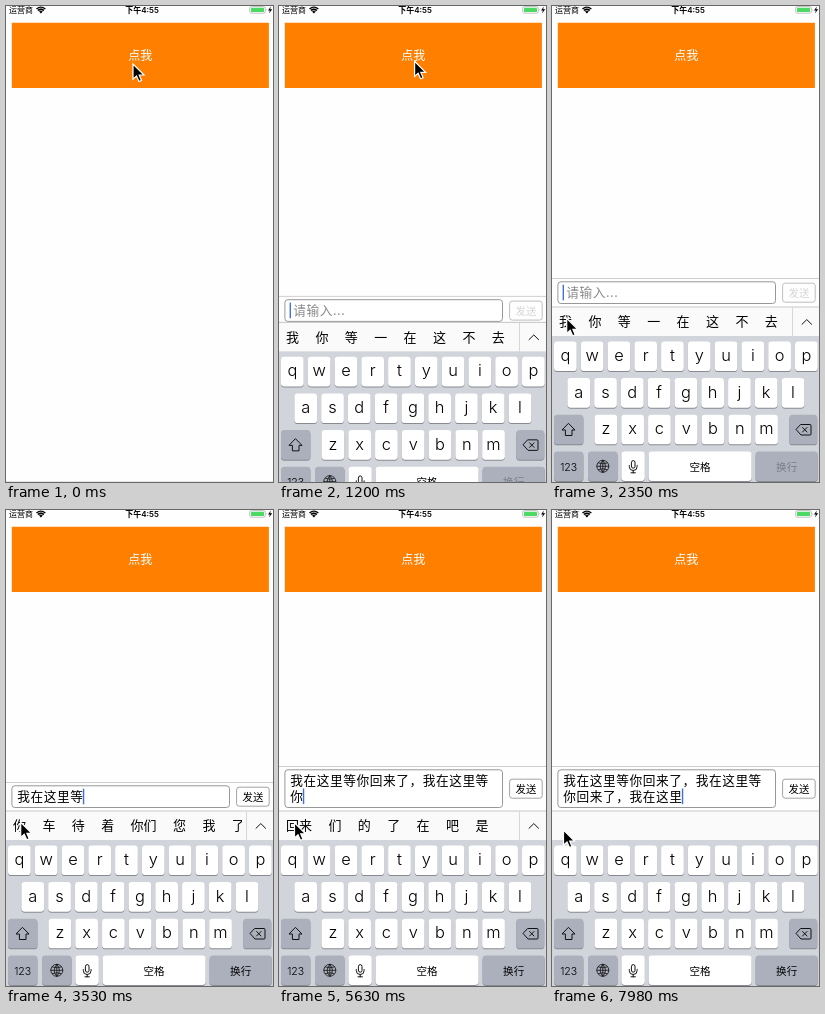
Animation of 267 by 476 pixels, one loop 8 s. Source, as an HTML page:

```html
<!DOCTYPE html>
<html lang="zh-CN">
<head>
<meta charset="utf-8">
<title>键盘输入</title>
<style>
html, body { margin: 0; width: 100%; height: 100%; overflow: hidden; background: #fff; }
svg { display: block; width: 267px; height: 476px; }
text { font-family: "Noto Sans CJK SC", "Noto Sans CJK", sans-serif; font-weight: 350; fill: #000; }
.latin { font-family: Inter, Roboto, sans-serif; }
.clock { font-family: Inter, "Noto Sans CJK SC", sans-serif; font-weight: 600; }
.entry { font-size: 12.7px; letter-spacing: .55px; }
.mid { text-anchor: middle; }
.icon { fill: none; stroke: #111; stroke-width: 1; stroke-linejoin: round; stroke-linecap: round; }
</style>
</head>
<body>
<svg viewBox="0 0 267 476">
  <defs><clipPath id="clip"><rect x="0" y="301" width="236" height="29"/></clipPath></defs>
  <rect width="267" height="476" fill="#fefefe"/>

  <g id="status">
    <text x="3" y="6.8" font-size="8">运营商</text>
    <path d="M30 2.6Q34.9 -1.6 39.8 2.6L34.9 7.6Z"/>
    <path d="M30.8 3.9Q34.9 .4 39 3.9M32.3 5.5Q34.9 3.3 37.5 5.5" fill="none" stroke="#fefefe" stroke-width=".7"/>
    <text class="mid clock" x="136" y="6.8" font-size="8">下午4:55</text>
    <rect x="243.7" y=".6" width="15.6" height="6.6" rx="1.6" fill="none" stroke="#aaa" stroke-width=".7"/>
    <rect x="245" y="1.8" width="13" height="4.2" rx=".6" fill="#4cd964"/>
    <path d="M260.1 2.8q1.2 1.1 0 2.2z" fill="#aaa"/>
    <path d="M264.8 .4L262 4.4H263.9L263 7.4L266.2 3.3H264.2Z"/>
  </g>

  <rect x="5.8" y="16.75" width="257.1" height="65.25" fill="#ff8000"/>
  <text class="mid" x="134.2" y="53.5" font-size="12" style="fill:#fff">点我</text>

  <g id="bar">
    <rect id="barBg" x="-1" width="269" fill="#fefefe" stroke="#c4c4c6" stroke-width=".8"/>
    <rect id="field" x="5.9" width="217.6" rx="3" fill="#fff" stroke="#8c8c8c" stroke-width=".9"/>
    <text id="hint" class="entry" x="14.3" y="291.4" style="fill:#8a8a8a">请输入...</text>
    <text id="line1" class="entry" x="11.3"></text>
    <text id="line2" class="entry" x="11.3"></text>
    <rect id="caret" width="1.4" height="15.6" fill="#3f6fe0"/>
    <g id="send">
      <rect x="230.6" y="277.2" width="32.6" height="19" rx="2.6" fill="#fff" stroke="#8c8c8c" stroke-width=".8"/>
      <text class="mid" x="246.9" y="290.8" font-size="10.4">发送</text>
    </g>
  </g>

  <g id="board">
    <rect y="301" width="267" height="29.5" fill="#fafafa"/>
    <path d="M0 301H267" stroke="#b9b9bb" stroke-width=".8"/>
    <rect y="330" width="267" height="180" fill="#d1d4da"/>
    <g id="strip">
      <g id="words" clip-path="url(#clip)"></g>
      <path d="M240.5 301.5V330" stroke="#cfcfd1" stroke-width=".8"/>
      <path class="icon" d="M250 318.3L254.8 313.6L259.6 318.3"/>
    </g>
    <g id="keys"></g>
    <path class="icon" d="M16.7 417.6L23 424H20V429.5H13.4V424H10.4Z"/>
    <path class="icon" d="M249 418.5H258Q259 418.5 259 419.5V428Q259 429 258 429H249L244.3 423.7ZM250.6 421.5L255 426M255 421.5L250.6 426"/>
    <path class="icon" style="stroke-width:.8" d="M44.8 460.3a6 6 0 1 0 12 0a6 6 0 1 0 -12 0H56.8M50.8 454.3V466.3M50.8 454.3q-5.4 6 0 12q5.4 -6 0 -12M46.4 457q4.4 1.8 8.8 0M46.4 463.6q4.4 -1.8 8.8 0"/>
    <path class="icon" d="M79.4 456.4a1.8 1.8 0 0 1 3.6 0V460.4a1.8 1.8 0 0 1 -3.6 0ZM77.3 459.5V460.6a3.9 3.9 0 0 0 7.8 0V459.5M81.2 464.6V466.8M79 466.8H83.4"/>
  </g>

  <path id="cursor" d="M0 0V15.2L3.5 12L6 17.5L8.5 16.4L6.2 11H11Z" fill="#000" stroke="#fff" stroke-width="1.2"/>
</svg>
<script>
const LOOP = 8000, EM = 13.25, WRAP = 15, GROW_AT = 5370;
const $ = id => document.getElementById(id);
const clamp = x => Math.max(0, Math.min(1, x));
const smooth = x => x * x * (3 - 2 * x);

function add(parent, tag, attrs, text) {
  const el = document.createElementNS('http://www.w3.org/2000/svg', tag);
  for (const k in attrs) el.setAttribute(k, attrs[k]);
  if (text) el.textContent = text;
  parent.appendChild(el);
  return el;
}

// Keyboard
function key(x, y, w, label, size, dark) {
  const box = { x, width: w, height: 29.6, rx: 3.4 };
  add($('keys'), 'rect', { ...box, y: y + 1, fill: '#888b91' });
  add($('keys'), 'rect', { ...box, y, fill: dark ? '#abb0bc' : '#fff' });
  if (!label) return;
  const latin = /\w/.test(label);
  const base = latin && size > 12 ? 19.6 : 19.2;
  return add($('keys'), 'text',
    { class: latin ? 'latin mid' : 'mid', x: x + w / 2, y: y + base, 'font-size': size }, label);
}
[['qwertyuiop', 2, 335.5], ['asdfghjkl', 15.4, 372.1], ['zxcvbnm', 42.5, 408.7]]
  .forEach(([row, x, y]) => [...row].forEach((c, i) => key(x + i * 26.78, y, 22.7, c, 16.4)));
key(2, 408.7, 29.4, '', 0, true);
key(237.3, 408.7, 28, '', 0, true);
key(2, 445.4, 29.4, '123', 10.6, true);
key(36, 445.4, 29.6, '', 0, true);
key(69.4, 445.4, 23.4);
key(96.6, 445.4, 103, '空格', 10.6);
const enter = key(203.6, 445.4, 62.2, '换行', 10.6, true);

// Suggestions offered after each word
const NEXT = {
  '': '我 你 等 一 在 这 不 去',
  '我': '在 是 也 想 的 们 要 等',
  '在': '这里 家 哪 吗 那 上 的',
  '这里': '等 的 了 是 有 呢 吗 我',
  '等': '你 车 待 着 你们 您 我 了',
  '你': '回来 们 的 了 在 吧 是',
  '回来': '了 的 吧 吗 就 再 后 呢',
  '了': '， 。 吗 吧 呢 就 我 你',
  '，': '我 你 在 就 不 这 那 他'
};
const PHRASE = ['我', '在', '这里', '等', '你', '回来', '了', '，'];
const TAPS = [2590, 3100, 3300, 3480, 3600, 3780, 3930, 4200, 4550, 4900,
  5130, 5295, GROW_AT, 5640, 5860, 6070, 6240, 7180, 7965];
const INSTANT = 6240;
const FADES = [1450, 2440, 6590, 7530];
const PATH = [
  [0, 127, 58], [200, 127, 58], [440, 135, 55.3], [750, 135, 55.3], [770, 135.6, 55.3],
  [1290, 135.6, 55.3], [1770, 66, 252], [2040, 8, 304], [2320, 14.7, 312.3], [3900, 14.7, 312.3],
  [4250, 15.5, 313], [6600, 15.5, 312.7], [6800, 14.5, 314],
  [7010, 15, 313], [7300, 15, 313], [7800, 11.5, 320], [LOOP, 11.5, 320]
];

let shownWord = null;
function showWords(word) {
  if (word === shownWord) return;
  shownWord = word;
  $('words').textContent = '';
  let x = 7;
  for (const w of NEXT[word].split(' ')) {
    add($('words'), 'text', { x, y: 320.2, 'font-size': 13 }, w);
    x += w.length * 13 + 16.4;
  }
}

function caretAlpha(t, lastTap) {
  for (const f of FADES) {
    const a = t - f;
    if (f > lastTap && a > 0 && a < 420) return 1 - clamp(a / 150) + clamp((a - 270) / 150);
  }
  return 1;
}

function cursorAt(t) {
  let i = 1;
  while (i < PATH.length - 1 && PATH[i][0] < t) i++;
  const [t0, x0, y0] = PATH[i - 1], [t1, x1, y1] = PATH[i];
  const p = smooth(clamp((t - t0) / (t1 - t0)));
  return [x0 + (x1 - x0) * p, y0 + (y1 - y0) * p];
}

const shift = (el, x, y) => el.setAttribute('transform', `translate(${x} ${y})`);
const set = (id, k, v) => $(id).setAttribute(k, v);

function draw(t) {
  const away = Math.pow(1 - clamp((t - 960) / 500), 3.7);
  shift($('board'), 0, 175 * away);
  shift($('bar'), 0, 204 * away);

  const count = TAPS.filter(s => s <= t).length;
  const lastTap = count ? TAPS[count - 1] : 0;
  const words = Array.from({ length: count }, (_, i) => PHRASE[i % PHRASE.length]);
  const typed = words.join('');
  const blank = count && lastTap !== INSTANT && t - lastTap < 42;
  showWords(count ? words[count - 1] : '');
  $('strip').style.display = blank ? 'none' : '';

  const grow = 16 * smooth(clamp((t - GROW_AT) / 160));
  set('barBg', 'y', 272.4 - grow);
  set('barBg', 'height', 29 + grow);
  set('field', 'y', 275.8 - grow);
  set('field', 'height', 21.7 + grow);
  set('line1', 'y', 291.4 - grow);
  set('line2', 'y', 307.2 - grow);
  $('line1').textContent = typed.slice(0, WRAP);
  $('line2').textContent = typed.slice(WRAP);
  $('hint').style.display = typed ? 'none' : '';
  $('send').style.opacity = typed ? 1 : .7;
  $('send').lastElementChild.style.fill = typed ? '#000' : '#c4c4c4';
  enter.style.fill = typed ? '#000' : '#787d88';
  shift($('send'), 0, -grow / 2);

  const second = typed.length > WRAP;
  set('caret', 'x', 10.6 + EM * (typed.length - (second ? WRAP : 0)));
  set('caret', 'y', 278.7 - grow + (second ? 15.8 : 0));
  set('caret', 'opacity', caretAlpha(t, lastTap));

  shift($('cursor'), ...cursorAt(t));
}

const start = performance.now();
function tick() {
  draw((performance.now() - start) % LOOP);
  requestAnimationFrame(tick);
}
tick();
</script>
</body>
</html>
```
